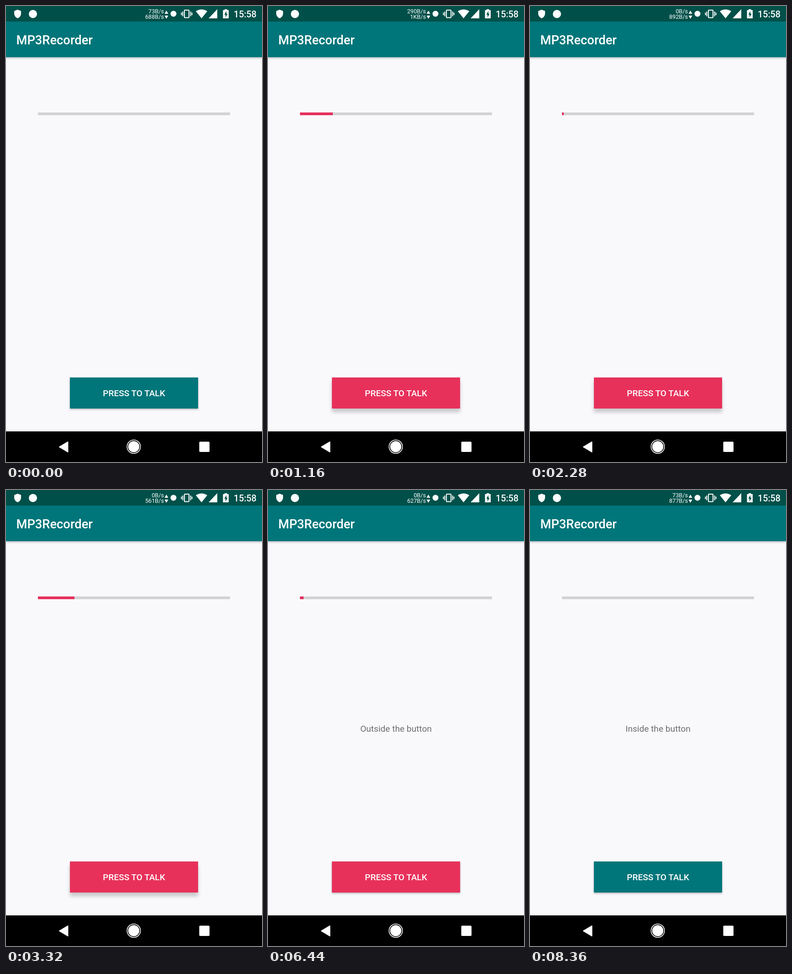
These frames come from a looping animation (561 px wide and 998 px high, 9360 ms). An HTML page:

```html
<!DOCTYPE html>
<html lang="en">
<head>
<meta charset="utf-8">
<title>MP3Recorder</title>
<style>
  html, body { margin: 0; width: 100%; height: 100%; overflow: hidden; background: #f9f9fc; }
  body { position: relative; font-family: Roboto, sans-serif; }
  div, svg { position: absolute; }
  #tool { left: 0; top: 0; width: 561px; height: 112px; background: #00767a; box-shadow: 0 2px 4px rgba(0,0,0,.28); }
  #status { left: 0; top: 0; width: 561px; height: 34px; background: #005049; }
  #track { left: 70px; top: 233px; width: 421px; height: 6px; background: #d3d3d6; }
  #bar { height: 6px; background: #e4315c; }
  #button { left: 140px; top: 813px; width: 281px; height: 68px; }
  #nav { left: 0; top: 931px; width: 561px; height: 67px; background: #000; }
  svg { left: 0; top: 0; }
</style>
</head>
<body>
<div id="tool"></div>
<div id="status"></div>
<div id="track"><div id="bar"></div></div>
<div id="button"></div>
<div id="nav"></div>
<svg width="561" height="998" viewBox="0 0 561 998" fill="#fff">
  <!-- status icons -->
  <path d="M25.5 8 33 11V17Q32.500 24 25.500 27 18.500 24 18 17V11Z"/>
  <circle cx="59" cy="17.500" r="9"/>
  <path d="M351.500 10 355.500 17H347.500ZM351.500 28 355.500 21H347.500Z"/>
  <circle cx="367" cy="17" r="6.500"/>
  <g fill="none" stroke="#fff" stroke-width="2">
    <rect x="391" y="9" width="10" height="16.500" rx="1"/>
    <path d="M387.500 12V22.500M384.500 14.500V20M404.500 12V22.500M407.500 14.500V20"/>
  </g>
  <path d="M428.500 27 416 11.500Q428.500 3.500 441 11.500Z"/>
  <path d="M444 27H463V7Z"/>
  <path d="M479 7H484.500V9H488V27H475.500V9H479Z"/>
  <path d="M483 11 478.500 19H481V25L485.500 17H483Z" fill="#005049"/>
  <!-- navigation -->
  <path d="M117 965 135.500 954V976Z" stroke="#fff" stroke-width="2" stroke-linejoin="round"/>
  <circle cx="280" cy="964.500" r="12.200"/>
  <circle cx="280" cy="964.500" r="14.700" fill="none" stroke="#fff" stroke-width="1.600"/>
  <rect x="423.500" y="953.500" width="22.500" height="22.500" rx="2"/>
  <g font-size="12.700" text-anchor="end">
    <text id="up" x="346" y="16"></text>
    <text id="down" x="346" y="28"></text>
  </g>
  <g font-weight="500">
    <text x="499" y="24.500" font-size="19.700">15:58</text>
    <text x="22.500" y="84" font-size="27.300">MP3Recorder</text>
    <text x="280.500" y="854" font-size="19.100" text-anchor="middle">PRESS TO TALK</text>
  </g>
  <text id="hint" x="280.500" y="529" font-size="19.100" text-anchor="middle" fill="#6e6e70"></text>
</svg>
<script>
const LOOP = 9360;
const el = id => document.getElementById(id);

// Each list holds [start ms, value].
// A run of sound levels sampled every 80 ms
const run = (start, levels) => levels.map((v, i) => [start + i * 80, v]);
const level = [
  [0, 0],
  ...run(440, [1, 3, 12, 34, 52, 41, 60, 38, 26, 17]),
  ...run(1240, [9, 28, 55, 72, 48, 63, 36, 20, 44, 57, 30, 14]),
  ...run(2200, [6, 1]),
  ...run(2600, [58, 0]),
  ...run(2840, [12, 48, 91, 66, 53, 34, 19, 7, 1]),
  ...run(5080, [3]),
  ...run(5320, [7, 4, 1]),
  ...run(5640, [3]), [5680, 1],
  ...run(6040, [40, 1]),
  ...run(6280, [9, 5, 2, 14]),
  [6680, 1], [7040, 0]
];
const speed = [
  [0, ["73B/s", "688B/s"]], [280, ["290B/s", "1KB/s"]],
  [1240, ["0B/s", "904B/s"]], [2280, ["0B/s", "892B/s"]],
  [3320, ["0B/s", "561B/s"]], [4320, ["73B/s", "743B/s"]],
  [5320, ["0B/s", "586B/s"]], [6360, ["0B/s", "627B/s"]],
  [7360, ["78B/s", "815B/s"]], [8360, ["73B/s", "877B/s"]]
];
const hint = [
  [0, ""], [3720, "Outside the button"], [4880, "Inside the button"],
  [5640, "Outside the button"], [6520, "Inside the button"]
];

const at = (list, t) => list.findLast(([start]) => start <= t)[1];
const ramp = (t, from, to) => Math.min(1, Math.max(0, (t - from) / (to - from)));

function draw(t) {
  el("bar").style.width = at(level, t) * 4.21 + "px";
  [el("up").textContent, el("down").textContent] = at(speed, t);
  el("hint").textContent = at(hint, t);
  const lift = ramp(t, 240, 400) - ramp(t, 3700, 3880);
  const css = el("button").style;
  css.background = t >= 240 && t < 7040 ? "#e7315b" : "#00767a";
  css.boxShadow = `0 ${2 + 6 * lift}px ${4 + 4 * lift}px rgba(0,0,0,${0.28 - 0.08 * lift})`;
}

const begin = performance.now();
function tick() {
  draw((performance.now() - begin) % LOOP);
  requestAnimationFrame(tick);
}
tick();
</script>
</body>
</html>
```
